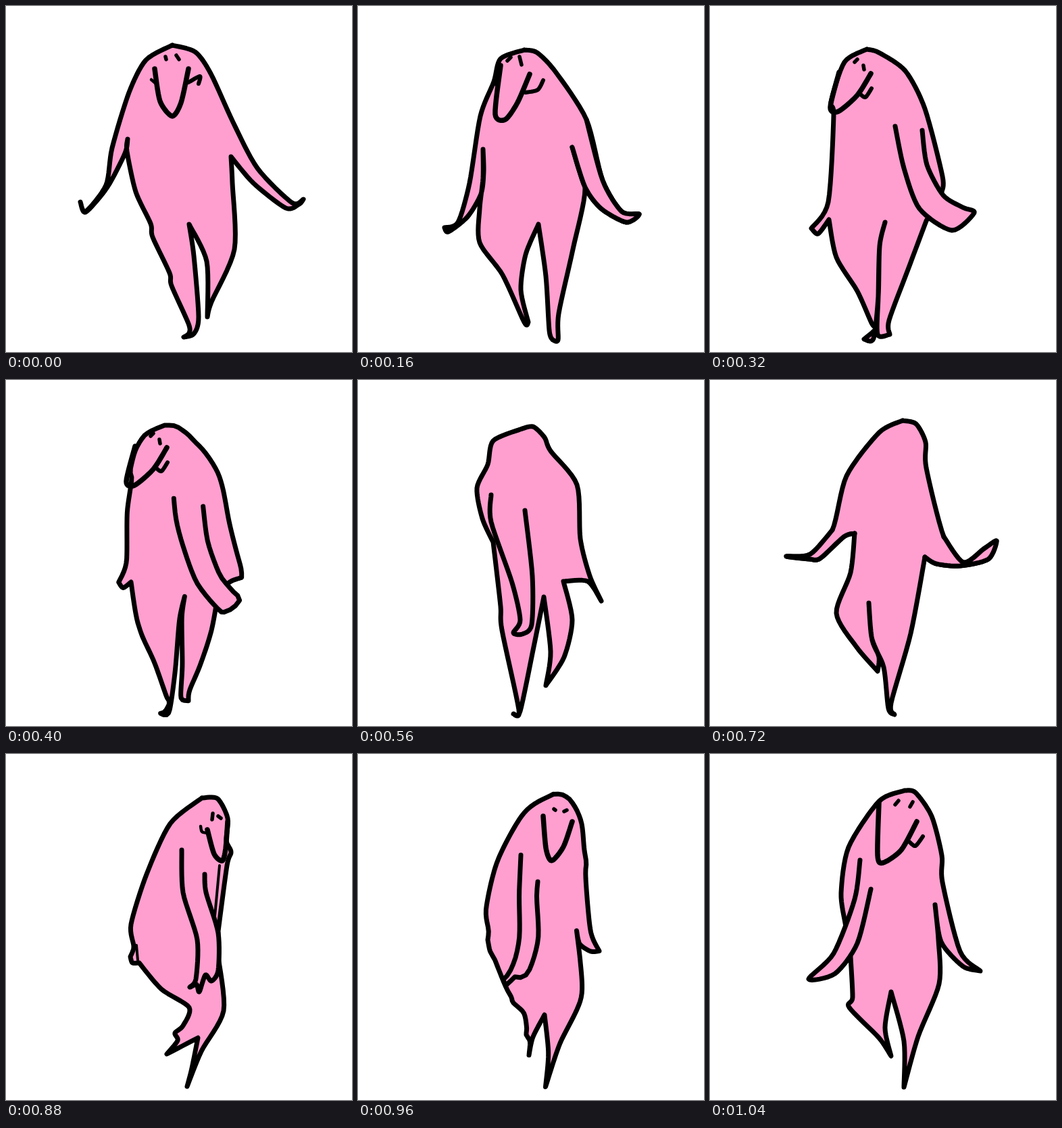
Write an HTML page with a canvas that moves like this. It is 512 px wide and 512 px high and loops after 1.12 s.

```html
<!DOCTYPE html>
<html lang="en">
<head>
<meta charset="utf-8">
<title>Turning walk</title>
<style>
html, body { margin: 0; width: 100%; height: 100%; overflow: hidden; background: #fff; }
canvas { display: block; width: 100vw; height: 100vh; }
</style>
</head>
<body>
<canvas id="stage" width="512" height="512"></canvas>
<script>
const STEP = 80, STEPS = 14, PINK = '#ff9fcf';
const LINES = { beak: 7.5, eyeL: 5.5, eyeR: 5.5, cheekL: 4.5, cheekR: 6, chest: 4, tail: 4 };
const ctx = document.getElementById('stage').getContext('2d');
const poses = [];

const mix = (a, b, t) => a + (b - a) * t;
const points = text => text.trim().match(/\d+ \d+/g).map(pair => pair.split(' ').map(Number));

// Smooth curve through the given points.
function curve(pts) {
  const line = [pts[0]], at = i => pts[Math.max(0, Math.min(pts.length - 1, i))];
  for (let i = 0; i < pts.length - 1; i++)
    for (let k = 1; k <= 8; k++) {
      const t = k / 8, u = 1 - t;
      line.push([0, 1].map(c => {
        const [o, a, b, d] = [-1, 0, 1, 2].map(n => at(i + n)[c]);
        return a * u * u * (1 + 2 * t) + b * t * t * (3 - 2 * t)
          + 0.4 * t * u * ((b - o) * u - (d - a) * t);
      }));
    }
  return line;
}

// Evenly spaced points along a polyline.
function resample(line, count = 40) {
  const sums = [0];
  for (let i = 1; i < line.length; i++)
    sums.push(sums[i - 1] + Math.hypot(line[i][0] - line[i - 1][0], line[i][1] - line[i - 1][1]));
  const total = sums[sums.length - 1];
  let k = 1;
  return Array.from({ length: count }, (_, i) => {
    const d = total * i / (count - 1);
    while (k < line.length - 1 && sums[k] < d) k++;
    const t = (d - sums[k - 1]) / (sums[k] - sums[k - 1]);
    return [0, 1].map(c => mix(line[k - 1][c], line[k][c], t));
  });
}

// The outline has eight pieces, each starting where the last one ended: outer arm,
// inner arm, outer leg, inner leg, then the same in reverse back to the head.
function pose(at, outline, parts, spreadArms) {
  const body = outline.split('|').map(points);
  for (let i = 1; i < body.length; i++) body[i].unshift(body[i - 1].at(-1));
  body[7].push(body[0][0]);
  const p = { at };
  body.forEach((piece, i) => p['body' + i] = curve(piece));
  for (const key in parts) p[key] = curve(points(parts[key]));
  if (spreadArms) {
    p.nearL = curve(spreadArms === 'both'
      ? [...body[0].slice(-3), ...body[1].slice(1)]
      : [...body[6], ...body[7].slice(1, 4)]);
    if (spreadArms === 'both') p.nearR = curve([...body[6], ...body[7].slice(1, 4)]);
  }
  poses.push(p);
}

pose(0, `246 58 207 80 182 128 157 210 148 265 118 304 110 290
  | 118 305 150 268 176 218 180 197
  | 179 215 192 275 214 322 217 342 242 395 245 414 270 470 271 484 263 490
  | 278 485 285 460 278 370 271 323 | 297 378 298 460
  | 304 438 338 360 335 262 333 223 | 366 262 414 299 434 293 440 286
  | 423 291 372 240 336 172 303 100 280 68`, {
  beak: '220 93 228 141 246 163 259 143 270 93',
  eyeL: '236 75 237 79', eyeR: '252 73 256 79',
  cheekL: '215 109 222 115', cheekR: '270 113 287 104 285 115'
});

pose(2, `246 65 211 78 201 112 181 163 165 262 148 320 128 328
  | 134 334 162 312 182 278 186 245 185 212
  | 185 255 180 300 180 350 214 398 246 468 252 468
  | 241 420 248 368 267 323 | 278 400 283 480 288 494
  | 296 494 297 455 318 360 336 270 317 209 | 336 268 360 300 397 320 416 308
  | 390 304 362 258 338 168 292 97 265 69`, {
  beak: '211 88 203 160 218 168 236 143 254 101',
  eyeL: '221 81 226 76', eyeR: '239 75 242 87',
  cheekL: '202 112 206 120', cheekR: '248 128 266 124 274 110'
}, 'right');

pose(4, `232 64 199 83 179 142 183 162 175 290 150 329
  | 160 337 176 316 | 187 372 218 422 239 469 245 478 228 493
  | 242 492 249 430 251 355 259 320 | 251 355 249 430 248 486 266 486
  | 265 465 293 390 320 318 | 330 300 343 275
  | 344 252 318 152 289 96 250 69`, {
  nearL: '274 178 287 240 310 300 358 332 391 306 374 298 345 280 321 235 314 184',
  beak: '191 98 178 150 190 156 218 132 238 100',
  eyeL: '214 83 218 79', eyeR: '227 88 228 94', cheekR: '222 130 230 135 239 122'
});

pose(7, `240 73 200 90 192 125 176 160 184 205 200 240
  | 203 265 | 211 335 213 370 238 488 230 494
  | 240 490 260 395 275 321 | 285 402 278 452
  | 305 410 317 355 304 298 | 340 298 360 327
  | 343 290 329 235 324 155 285 105 276 85 259 69`, {
  nearL: '197 170 197 210 228 300 240 355 230 374 243 376 257 362 258 290 247 193'
});

pose(9, `285 60 250 78 202 142 181 222 148 258 113 261
  | 147 265 163 264 198 232 214 227 | 208 285 187 345 216 394 248 431
  | 250 410 239 380 235 330 | 240 385 257 425 264 486 273 495
  | 268 478 297 375 318 262 | 335 272 370 275 412 265 424 238
  | 405 250 375 270 346 232 320 130 319 92 305 65`, {}, 'both');

pose(11, `290 65 243 103 208 178 185 252 189 285 184 300
  | 187 309 197 309 | 230 348 271 375 262 402 250 413 254 424 238 444
  | 284 420 | 275 465 268 492 | 289 440 322 380 314 300 | 314 262
  | 327 165 333 145 326 128 328 95 313 66`, {
  nearR: '260 142 262 205 283 275 281 333 272 345 282 341 286 352 295 327 304 336 314 320 314 265 296 205 294 178',
  beak: '298 112 308 148 320 158 325 140 328 100',
  eyeL: '306 88 305 97', eyeR: '314 92 318 95', cheekL: '288 107 290 115 298 117',
  chest: '316 165 309 240', tail: '193 283 195 305'
});

pose(13, `288 54 250 70 205 138 194 206 200 250
  | 208 300 | 211 360 206 375 250 420 268 447
  | 259 405 268 352 | 287 425 287 493
  | 308 418 339 340 338 275 333 223 | 342 278 374 314 400 321
  | 370 292 344 190 343 150 328 92 304 57`, {
  nearR: '222 157 214 215 183 295 146 333 185 325 218 280 238 200',
  beak: '250 72 248 150 256 161 283 142 306 100',
  eyeL: '274 75 279 69', eyeR: '296 78 300 71', cheekR: '295 130 304 136 315 122'
});

function blend(a, b, t) {
  if (t === 0) return a;
  if (!a || !b) return t < 0.5 ? a : t > 0.5 ? b : undefined;
  const to = resample(b);
  return resample(a).map((p, i) => p.map((v, c) => mix(v, to[i][c], t)));
}

function poseAt(step) {
  const i = poses.findLastIndex(p => p.at <= step);
  const a = poses[i], b = poses[(i + 1) % poses.length];
  const t = step === a.at ? 0 : (step - a.at) / (b.at - a.at);
  const part = key => blend(a[key], b[key], t);
  return {
    body: Array.from({ length: 8 }, (_, n) => part('body' + n)).flat(),
    arms: ['nearL', 'nearR'].map(part),
    lines: Object.keys(LINES).map(key => [part(key), LINES[key]])
  };
}

function draw(line, width, filled) {
  if (!line) return;
  ctx.beginPath();
  line.forEach(p => ctx.lineTo(...p));
  if (filled) ctx.fill();
  ctx.lineWidth = width;
  ctx.stroke();
}

const cycle = Array.from({ length: STEPS }, (_, i) => poseAt(i));

function render() {
  const { body, arms, lines } = cycle[Math.floor(performance.now() / STEP) % STEPS];
  ctx.fillStyle = '#fff';
  ctx.fillRect(0, 0, 512, 512);
  ctx.fillStyle = PINK;
  ctx.strokeStyle = '#000';
  ctx.lineCap = ctx.lineJoin = 'round';
  draw(body, 7, true);
  arms.forEach(arm => draw(arm, 7, true));
  lines.forEach(([line, width]) => draw(line, width));
  requestAnimationFrame(render);
}
render();
</script>
</body>
</html>
```
